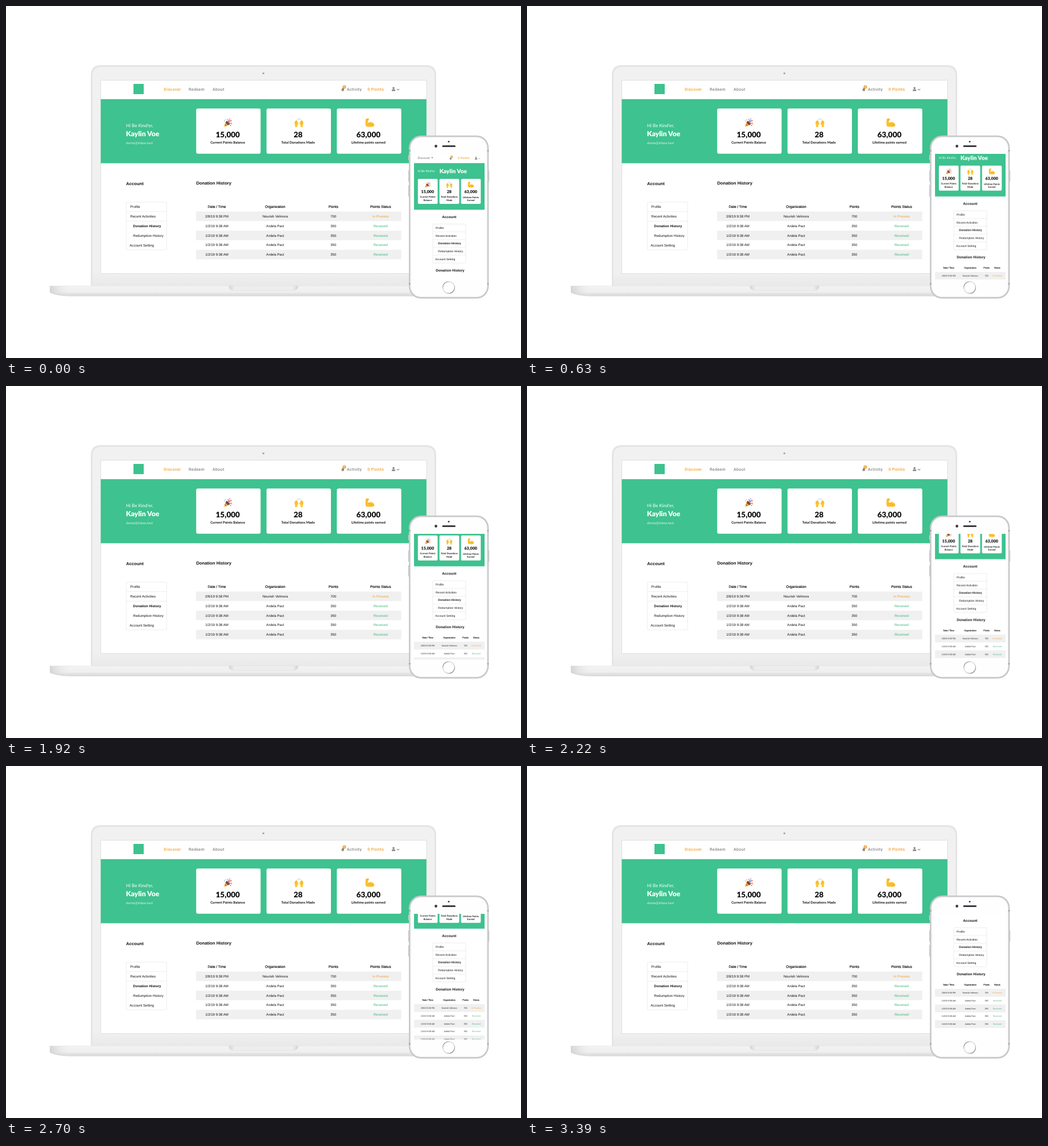
Recreate the animation shown at these times as an HTML page. Size 905x619 px, loop 4620 ms.

```html
<!DOCTYPE html>
<html lang="en">
<head>
<meta charset="utf-8">
<title>Points dashboard</title>
<style>
html, body { margin: 0; width: 100%; height: 100%; overflow: hidden; background: #fff; }
svg { display: block; width: 100%; height: 100%; }
text { text-rendering: geometricPrecision; white-space: pre; }
.sans { font-family: "Liberation Sans", Arial, sans-serif; }
.round { font-family: Lato, sans-serif; }
.nav { font-family: Roboto, sans-serif; font-weight: 500; }
.b { font-weight: 700; }
.k { font-weight: 900; }
.head { stroke: #111; stroke-width: .18px; }
#page { animation: scroll 4620ms infinite; }
@keyframes scroll {
  0% { transform: translateY(0); animation-timing-function: cubic-bezier(.37, 0, .63, 1); }
  24.026% { transform: translateY(-38.4px); animation-timing-function: linear; }
  37.446% { transform: translateY(-38.6px); animation-timing-function: cubic-bezier(.37, 0, .63, 1); }
  60.39% { transform: translateY(-72.8px); animation-timing-function: cubic-bezier(.37, 0, .63, 1); }
  71.429%, 100% { transform: translateY(-99px); }
}
</style>
</head>
<body>
<svg viewBox="0 0 905 619" preserveAspectRatio="none">
  <defs>
    <linearGradient id="lid" x1="0" y1="0" x2="0" y2="1">
      <stop offset="0" stop-color="#f1f1f1"/><stop offset=".94" stop-color="#f0f0f0"/><stop offset="1" stop-color="#e9e9e9"/>
    </linearGradient>
    <linearGradient id="base" x1="0" y1="0" x2="0" y2="1">
      <stop offset="0" stop-color="#f3f3f3"/><stop offset=".6" stop-color="#efefef"/><stop offset=".75" stop-color="#e2e2e2"/><stop offset="1" stop-color="#d8d8d8"/>
    </linearGradient>
    <linearGradient id="side">
      <stop offset="0" stop-color="#c8c8c8" stop-opacity=".7"/><stop offset=".05" stop-color="#eee" stop-opacity="0"/>
    </linearGradient>
    <linearGradient id="notch">
      <stop offset="0" stop-color="#d2d2d2"/><stop offset=".08" stop-color="#ededed"/><stop offset=".92" stop-color="#ededed"/><stop offset="1" stop-color="#d2d2d2"/>
    </linearGradient>
    <linearGradient id="ring" x1="0" y1="0" x2="1" y2="1">
      <stop offset="0" stop-color="#555"/><stop offset=".35" stop-color="#d5d5d5"/><stop offset=".65" stop-color="#ccc"/><stop offset="1" stop-color="#444"/>
    </linearGradient>
    <clipPath id="view"><rect x="717" y="260.5" width="124" height="220.5"/></clipPath>

    <g id="party">
      <path d="M.5 15.5 4.5 5.5 10.5 11.5Z" fill="#f5b93a"/>
      <path d="M3.6 7.8 8.2 12.4M2.3 11 5.2 13.8" stroke="#a0522d" stroke-width="1.1"/>
      <ellipse cx="7.5" cy="8.5" rx="1.8" ry="4.2" transform="rotate(-45 7.5 8.5)" fill="#6d4334"/>
      <path d="M7.5 7.5Q9.5 4.5 7.6 1.5M9 8.6Q11 4.5 14.6 4M9.5 9.6Q12.5 8 15 10.5" fill="none" stroke="#e25563" stroke-width="1.2"/>
      <path d="M8.4 7.9 11.5 2.2" stroke="#5fa8dc" stroke-width="1.1"/>
      <g fill="#f2b632"><circle cx="4" cy="2.5" r=".9"/><circle cx="14" cy="7" r=".8"/></g>
      <g fill="#8c6bc8"><circle cx="11" cy=".9" r=".8"/><circle cx="12.5" cy="13" r=".9"/></g>
      <circle cx="1.7" cy="4.6" r=".8" fill="#5fa8dc"/>
    </g>
    <g id="palm">
      <path d="M1.2 15.8V12.5Q-.4 9.5 .5 6.2Q1 4.8 1.6 6L2 4.4Q2.6 3.5 3.2 4.3Q4 3.3 4.6 4.6Q5.4 4.2 5.6 5.4L5.7 8.7Q6.6 7.4 7.3 8.2Q7 11 5 12.6V15.8Z" fill="#fcc535"/>
      <path d="M2.1 6V8.6M3.4 5.6V8.6M4.7 6V8.6" stroke="#e59f25" stroke-width=".4"/>
    </g>
    <g id="hands">
      <use href="#palm"/><use href="#palm" transform="matrix(-1 0 0 1 16 0)"/>
      <path d="M8 .3V3M5.2 .7 6 3.2M10.8 .7 10 3.2" stroke="#8cc4ea" stroke-width=".8"/>
    </g>
    <g id="arm">
      <path d="M.5 3Q.4 .8 2.6 .5L5.6 .6Q7 1.2 6.2 2.8L5.4 4.2 4.6 4.5Q4.2 7 5.2 8.6Q8.2 5.8 11.6 7.2Q16.2 9 15.9 13Q15.5 15 11 15.2Q4.5 15.8 .8 14.2Q-.3 10 .5 3Z" fill="#fcc02d"/>
      <path d="M5.2 8.6Q6 10.3 7.8 10.6M2.6 3.1 5.2 2.7M9.5 12.4Q12 12.6 13.2 11" fill="none" stroke="#dd9420" stroke-width=".6"/>
    </g>
    <g id="bell">
      <path d="M-2.9 2.3Q-1.8 1.2-1.8-.6Q-1.6-3 0-3.2Q1.6-3 1.8-.6Q1.8 1.2 2.9 2.3ZM-.9 2.8H.9Q.7 3.7 0 3.7T-.9 2.8Z" fill="#858585" transform="rotate(12)"/>
      <circle cx="2.5" cy="-4" r="3" fill="#f2a033"/>
      <text class="nav" x="2.5" y="-2.4" font-size="4.4" fill="#fff" text-anchor="middle">0</text>
    </g>
    <g id="user">
      <circle cy="-1.7" r="1.8" fill="#858585"/>
      <path d="M-3.1 3.4V2.4Q-3.1 .5-1.2 .5H1.2Q3.1 .5 3.1 2.4V3.4Z" fill="#858585"/>
      <path d="M6-.2 8 1.8 10-.2" fill="none" stroke="#858585" stroke-width="1.1"/>
    </g>
  </defs>

  <!-- laptop -->
  <path d="M149 492V122Q149 104 167 104H738Q756 104 756 122V492Z" fill="#e5e5e5"/>
  <path d="M152 492V123Q152 107 168 107H737Q753 107 753 123V492Z" fill="url(#lid)"/>
  <circle cx="452.3" cy="118.5" r="1.8" fill="#aaa"/>
  <rect x="166.5" y="130.5" width="572.5" height="340" fill="#fff" stroke="#d9d9d9" stroke-width=".8"/>
  <path id="foot" d="M77 492H828V504Q815 510.500 790 510.500H115Q90 510.500 77 504Z" fill="url(#base)"/>
  <path d="M77 492H828V504Q815 510.500 790 510.500H115Q90 510.500 77 504Z" fill="url(#side)"/>
  <path d="M77 492.300H828" stroke="#e3e3e3" stroke-width=".6"/>
  <path d="M391.500 492H513.500Q513 500.500 504 500.500H401Q392 500.500 391.500 492Z" fill="url(#notch)" stroke="#dcdcdc" stroke-width=".5"/>

  <rect x="224" y="137" width="18" height="18" fill="#3ec28f"/>
  <g id="desk"></g>

  <!-- phone -->
  <g fill="#c9c9c9">
    <rect x="706.8" y="262" width="2" height="9" rx=".8"/><rect x="706.8" y="289" width="2" height="20" rx=".8"/>
    <rect x="706.8" y="315" width="2" height="20" rx=".8"/><rect x="847.200" y="289" width="2" height="20" rx=".8"/>
  </g>
  <rect x="709.3" y="229.100" width="137.700" height="284" rx="20" fill="#fefefe" stroke="#c6c7c9" stroke-width="2.600"/>
  <rect x="711" y="230.800" width="134.300" height="280.600" rx="18.500" fill="none" stroke="#ececec" stroke-width=".9"/>
  <path d="M708 254.500h2.600M845.700 254.500h2.600M708 488.500h2.600M845.700 488.500h2.600" stroke="#9a9a9a" stroke-width="2"/>
  <circle cx="755.500" cy="246.500" r="2.400" fill="#3b3c40"/>
  <circle cx="778" cy="238.500" r="1.500" fill="#3b3c40"/>
  <rect x="766.500" y="245" width="23.500" height="3" rx="1.500" fill="#3b3c40"/>
  <circle cx="778" cy="495" r="10.300" fill="#fff" stroke="url(#ring)" stroke-width="1.100"/>
  <g clip-path="url(#view)">
    <rect x="717" y="260" width="124" height="222" fill="#fff"/>
    <g id="page"></g>
  </g>
</svg>
<script>
const green = '#3ec28f', orange = '#f0a030', grey = '#858585', ink = '#111';
const person = 'Kaylin Voe', hello = "Hi Be Kind'er,";
const icons = ['party', 'hands', 'arm'], totals = ['15,000', '28', '63,000'];
const menu = ['Profile', 'Recent Activities', 'Donation History', 'Redumption History', 'Account Setting'];
const gifts = [['2/8/19 9:38 PM', 'Nourish Velmora', '700', 'In Process']];
while (gifts.length < 5) gifts.push(['1/2/19 9:38 AM', 'Ardela Pact', '350', 'Received']);

// y is the middle of the capitals
const text = (s, x, y, size, cls, fill = ink, extra = '') =>
  `<text class="${cls}" x="${x}" y="${y + size * .36}" font-size="${size}" fill="${fill}" ${extra}>${s}</text>`;
const mid = (s, x, y, size, cls, fill) => text(s, x, y, size, cls, fill, 'text-anchor="middle"');
const nav = (s, x, y, size, fill = grey) => text(s, x, y, size, 'nav', fill, `letter-spacing="${size * .045}"`);
const box = (x, y, w, h, fill, r = 0) => `<rect x="${x}" y="${y}" width="${w}" height="${h}" rx="${r}" fill="${fill}"/>`;
const use = (id, x, y, k) => `<use href="#${id}" transform="translate(${x} ${y}) scale(${k})"/>`;

function list(x, y, w, step, size, lines, indents) {
  let out = `<rect x="${x}" y="${y}" width="${w}" height="${step * 5}" rx="1" fill="#fff" stroke="#e9e9e9" stroke-width=".8"/>`;
  for (let i = 1; i <= lines; i++)
    out += `<path d="M${x} ${y + i * step}h${w}" stroke="#e9e9e9" stroke-width=".7"/>`;
  menu.forEach((m, i) => {
    out += text(m, x + indents[i], y + (i + .5) * step, size, i === 2 ? 'sans b' : 'sans');
  });
  return out;
}

function table(x, w, cols, labels, headY, y, step, size) {
  let out = labels.map((s, i) => mid(s, cols[i], headY, size * 1.03, 'sans head')).join('');
  gifts.forEach((row, r) => {
    const cy = y + r * step;
    if (r % 2 === 0) out += box(x, cy - step / 2, w, step, '#f0f0f0');
    row.forEach((s, i) => {
      const fill = i < 3 ? ink : r ? '#3fb97f' : orange;
      out += mid(s, cols[i], cy, size, 'sans', fill);
    });
  });
  return out;
}

function desktop() {
  let out = nav('Discover', 277.3, 146, 7.1, orange) + nav('Redeem', 321, 146, 7.1) + nav('About', 363, 146, 7.1)
    + use('bell', 592, 146.6, 1) + nav('Activity', 599, 146, 7.1) + nav('0 Points', 635.3, 146, 7.2, orange)
    + use('user', 681, 146, 1)
    + box(166.5, 163.8, 572.3, 112.7, green)
    + text(hello, 211, 210.3, 8, 'round', '#fff')
    + text(person, 210.7, 225, 12.3, 'round k', '#fff')
    + text('demo@inbox.test', 211, 240.5, 6.2, 'round', '#d9f3e8');
  const notes = ['Current Points Balance', 'Total Donations Made', 'Lifetime points earned'];
  notes.forEach((note, i) => {
    const x = 334.2 + i * 123.6, c = x + 56.5;
    out += box(x, 180.3, 113.2, 79.5, '#fff', 3) + use(icons[i], c - 8.5 + i, 197.2, 1)
      + mid(totals[i], c - 1, 225.7, 13.5, 'round k') + mid(note, c - 1, 240.3, 6, 'round b');
  });
  return out + text('Account', 211, 312.7, 7.7, 'sans b') + text('Donation History', 334.2, 311, 7.7, 'sans b')
    + list(211.3, 344.8, 71, 16.8, 6.1, 2, [7, 7, 12, 12, 6])
    + table(334, 360.5, [370.5, 473, 575.3, 658.3], ['Date / Time', 'Organization', 'Points', 'Points Status'],
      352.7, 369.8, 16.8, 6.05);
}

function mobile() {
  let out = nav('Discover', 723.5, 267.5, 5.2) + '<path d="M747.300 266h3.400l-1.700 2.200z" fill="#858585"/>'
    + use('bell', 781.5, 268, .7) + nav('0 Points', 794, 267.5, 5.1, orange) + use('user', 826, 267.7, .7)
    + box(717, 276.3, 124, 82, green)
    + text(hello, 723.5, 290, 5.2, 'round', '#fff') + text(person, 761.7, 290, 10.1, 'round k', '#fff');
  const notes = [['Current Points', 'Balance'], ['Total Donations', 'Made'], ['Lifetime Points', 'Earned']];
  notes.forEach((note, i) => {
    const x = 723.8 + i * 37.9, c = x + 17.3;
    out += box(x, 304, 34.7, 44, '#fff', 2) + use(icons[i], c - 5.4, 308.9, .68)
      + mid(totals[i], c - .2, 326.8, 7.2, 'round k');
    note.forEach((s, j) => out += mid(s, c, 335.8 + j * 5.5 + (i === 2 ? .6 : 0), 4.2, 'round b'));
  });
  return out + mid('Account', 778.8, 371, 6.3, 'sans b') + mid('Donation History', 780.4, 464.5, 6.25, 'sans b')
    + list(750, 383.4, 58, 13.7, 5, 4, [5, 5, 9.3, 9.3, 4.3])
    + table(717, 124, [741, 779, 807.5, 826.3], ['Date / Time', 'Organization', 'Points', 'Status'],
      484.1, 497.7, 13.8, 3.65);
}

document.getElementById('desk').innerHTML = desktop();
document.getElementById('page').innerHTML = mobile();
</script>
</body>
</html>
```
